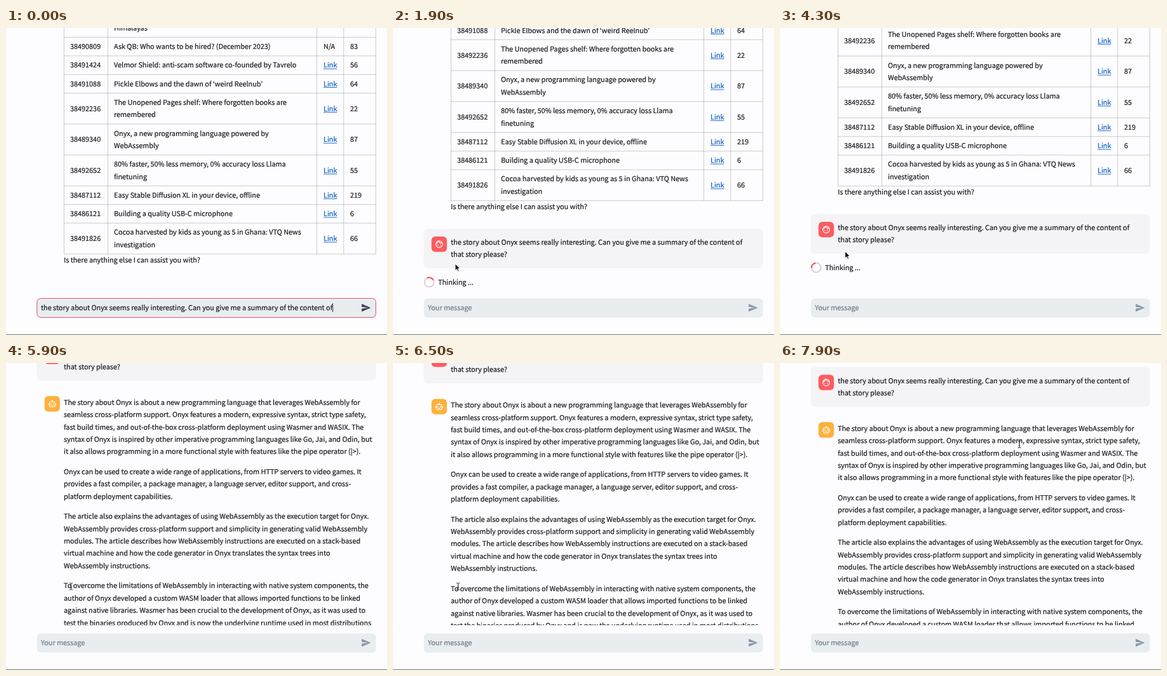
An HTML page that plays this animation: 600 by 483 pixels, repeating every 8 s.

```html
<!DOCTYPE html>
<html lang="en">
<head>
<meta charset="utf-8">
<title>Chat</title>
<style>
  html, body { margin: 0; width: 100%; height: 100%; overflow: hidden; background: #fdfcfe; }
  svg { display: block; }
  text {
    font: 10.85px "Noto Sans CJK KR", "Noto Sans CJK JP", "Noto Sans CJK SC", Lato, sans-serif;
    color: #191a21; fill: currentColor; stroke: currentColor; stroke-width: .2;
    white-space: pre; text-rendering: geometricPrecision;
  }
  .link { color: #0a5fbf; fill: currentColor; }
  .line { fill: none; stroke: #31333f; stroke-opacity: .3; stroke-width: .8; }
</style>
</head>
<body>
<svg id="stage" width="600" height="483" viewBox="0 0 600 483"></svg>
<script>
const LOOP = 8000, STEP = 100, LEADING = 19.41, ROW = 29.27;
const QUESTION = ['the story about Onyx seems really interesting. Can you give me a summary of the content of',
  'that story please?'];
const TAIL = ' that story please?';

const ROWS = [
  [38490809, ['Ask QB: Who wants to be hired? (December 2023)'], 83],
  [38491424, ['Velmor Shield: anti-scam software co-founded by Tavrelo'], 56],
  [38491088, ['Pickle Elbows and the dawn of ‘weird Reelnub’'], 64],
  [38492236, ['The Unopened Pages shelf: Where forgotten books are', 'remembered'], 22],
  [38489340, ['Onyx, a new programming language powered by', 'WebAssembly'], 87],
  [38492652, ['80% faster, 50% less memory, 0% accuracy loss Llama', 'finetuning'], 55],
  [38487112, ['Easy Stable Diffusion XL in your device, offline'], 219],
  [38486121, ['Building a quality USB-C microphone'], 6],
  [38491826, ['Cocoa harvested by kids as young as 5 in Ghana: VTQ News', 'investigation'], 66],
];

const ANSWER = [
  ['The story about Onyx is about a new programming language that leverages WebAssembly for',
   'seamless cross-platform support. Onyx features a modern, expressive syntax, strict type safety,',
   'fast build times, and out-of-the-box cross-platform deployment using Wasmer and WASIX. The',
   'syntax of Onyx is inspired by other imperative programming languages like Go, Jai, and Odin, but',
   'it also allows programming in a more functional style with features like the pipe operator (|>).'],
  ['Onyx can be used to create a wide range of applications, from HTTP servers to video games. It',
   'provides a fast compiler, a package manager, a language server, editor support, and cross-',
   'platform deployment capabilities.'],
  ['The article also explains the advantages of using WebAssembly as the execution target for Onyx.',
   'WebAssembly provides cross-platform support and simplicity in generating valid WebAssembly',
   'modules. The article describes how WebAssembly instructions are executed on a stack-based',
   'virtual machine and how the code generator in Onyx translates the syntax trees into',
   'WebAssembly instructions.'],
  ['To overcome the limitations of WebAssembly in interacting with native system components, the',
   'author of Onyx developed a custom WASM loader that allows imported functions to be linked',
   'against native libraries. Wasmer has been crucial to the development of Onyx, as it was used to',
   'test the binaries produced by Onyx and is now the underlying runtime used in most distributions'],
];

const $ = id => document.getElementById(id);
const escape = s => String(s).replace(/&/g, '&amp;').replace(/</g, '&lt;').replace(/>/g, '&gt;');

// y is the vertical middle of the line
const text = (x, y, s, attrs = '') => `<text x="${x}" y="${y + 3.8}" ${attrs}>${escape(s)}</text>`;
const lines = (x, y, list) => list.map((s, i) => text(x, y + i * LEADING, s)).join('');
const avatar = (y, color, icon) => `<g transform="translate(60.6 ${y})">
  <rect width="24.3" height="24.3" rx="6" fill="${color}"/>
  <g transform="translate(12.15 12.15)" fill="none" stroke="#fff" stroke-width="1.1">${icon}</g></g>`;

const FACE = `<circle r="5.3"/><path d="M-5.1-.8Q-1.9-1.8-.9-4.9Q1-1.3 5-1.8"/>
  <path d="M-2 .7v1.4M2 .7v1.4" stroke-width="1.3"/>`;
const ROBOT = `<rect x="-4.1" y="-3.3" width="8.2" height="8.1" rx="1"/>
  <path d="M0-3.3v-2.2M-1-5.4h2M-5.7-.6v2.8M5.7-.6v2.8M-2 2.7h4"/>
  <path d="M-1.9-.8v1.5M1.9-.8v1.5" stroke-width="1.5"/>`;

function table() {
  let y = 14.6, out = text(170, -.2, 'Himalayas'), rules = `M91 ${y}H582.5`;
  for (const [id, title, score] of ROWS) {
    const height = ROW + (title.length - 1) * LEADING, mid = y + height / 2;
    const linked = id !== 38490809;
    out += text(101, mid, id) + text(542, mid, score)
      + lines(170, mid - (title.length - 1) * LEADING / 2, title)
      + text(500, mid, linked ? 'Link' : 'N/A', linked ? 'class="link"' : '');
    if (linked) out += `<rect class="link" x="500" y="${mid + 5.2}" width="21.3" height=".9"/>`;
    y += height;
    rules += `M91 ${y}H582.5`;
  }
  for (const x of [91.4, 160.4, 489.5, 531.8, 582.3]) rules += `M${x} -10V${y}`;
  return out + `<path class="line" d="${rules}"/>`;
}

function answer() {
  let y = 496.4, out = avatar(486.6, '#fdb13c', ROBOT);
  for (const paragraph of ANSWER) {
    out += lines(91, y, paragraph);
    y += paragraph.length * LEADING + 12.13;
  }
  return out;
}

$('stage').innerHTML = `
  <rect width="600" height="483" fill="#fdfcfe"/>
  <g id="page">
    ${table()}${text(91, 365.4, 'Is there anything else I can assist you with?')}
    <g id="question">
      <rect x="48.5" y="400" width="534" height="62" rx="6" fill="#f4f3f6"/>
      ${avatar(412, '#fc5c5f', FACE)}${lines(91, 421.2, QUESTION)}
    </g>
    <g id="thinking">
      <g fill="none" stroke-width="2">
        <circle cx="57" cy="484" r="7.4" stroke="#d3d3d8"/>
        <path id="arc" d="M51.77 478.77A7.4 7.4 0 0 1 62.23 478.77" stroke="#f2505a"/>
      </g>
      ${text(71, 484, 'Thinking ...')}
    </g>
    <g id="answer">${answer()}</g>
  </g>
  <rect y="412.5" width="600" height="71" fill="#fdfcfe"/>
  <rect id="box" x="48.8" width="533.6" rx="6" fill="#e8edf0"/>
  ${text(55, 422.4, '', 'id="first"')}${text(55, 440, '', 'id="last"')}
  <rect id="caret" y="433" width=".9" height="14" fill="#191a21"/>
  <path id="send" transform="translate(558.8 432) scale(.68)" d="M2 21L23 12 2 3V10L17 12 2 14z"/>
  <rect y="482" width="600" height="1" fill="#77777b"/>
  <path id="arrow" d="M0 0V10.6L2.5 8.3 4.1 12 5.9 11.2 4.3 7.6H7.6z" fill="#111" stroke="#fff" stroke-width=".8"/>
  <path id="beam" d="M-2.5-5.5Q0-5.5 0-4Q0-5.5 2.5-5.5M0-4V4M-2.5 5.5Q0 5.5 0 4Q0 5.5 2.5 5.5M-1.3 1.5h2.6"
    fill="none" stroke="#222"/>`;

const show = (id, on) => $(id).setAttribute('display', on ? 'inline' : 'none');
const set = (id, attrs) => Object.entries(attrs).forEach(([k, v]) => $(id).setAttribute(k, v));
const progress = (t, from, to) => Math.min(1, Math.max(0, (t - from) / (to - from)));
const easeOut = u => 1 - (1 - u) ** 2.75;
const easeInOut = u => u < .5 ? 4 * u ** 3 : 1 - 4 * (1 - u) ** 3;
const mix = (a, b, u) => a + (b - a) * u;

const scrollAt = t => 107 * easeOut(progress(t, 1600, 2300))
  + 327.5 * easeOut(progress(t, 5200, 5900))
  - 41 * easeInOut(progress(t, 6200, 7200));

// [time, x, y]
const POINTER = [[1900, 98, 371], [2500, 102.5, 351.5], [6500, 102.5, 351.5], [7100, 160, 226], [7900, 377, 128]];
function pointerAt(t) {
  let [, x, y] = POINTER[0];
  for (let i = 1; i < POINTER.length; i++) {
    const [t0, x0, y0] = POINTER[i - 1], [t1, x1, y1] = POINTER[i];
    if (t >= t0) {
      const u = progress(t, t0, t1);
      x = mix(x0, x1, u);
      y = mix(y0, y1, u);
    }
  }
  return `translate(${x} ${y})`;
}

function drawInput(t) {
  const focused = t < 1700, typing = t < 1500;
  const count = t < 1400 ? Math.min(18, Math.floor(t * .015)) : TAIL.length;
  const wrapped = typing && count > 7;
  set('box', { y: wrapped ? 407.4 : 425.4, height: wrapped ? 48 : 30, stroke: focused ? '#e0525f' : 'none' });
  $('first').textContent = wrapped ? QUESTION[0] + ' that' : '';
  $('last').textContent = !typing ? 'Your message'
    : wrapped ? TAIL.slice(6, count) : QUESTION[0] + TAIL.slice(0, count);
  $('last').style.color = typing ? '' : '#757a87';
  show('caret', focused);
  set('caret', { x: 55 + (typing ? $('last').getComputedTextLength() : 0) });
  set('send', { fill: typing ? '#3d4150' : '#8d95a5' });
}

function draw(now) {
  const t = Math.floor(now % LOOP / STEP) * STEP;
  const asked = t >= 1700, answered = t >= 5300;
  show('question', asked);
  show('thinking', asked && !answered);
  show('answer', answered);
  set('page', { transform: `translate(0 ${-scrollAt(t)})` });
  set('arc', { transform: `rotate(${20 + .72 * (t - 1900)} 57 484)` });
  drawInput(t);
  show('arrow', asked && !answered);
  show('beam', answered);
  for (const id of ['arrow', 'beam']) set(id, { transform: pointerAt(t) });
  requestAnimationFrame(() => draw(performance.now() - start));
}
const start = performance.now();
draw(0);
</script>
</body>
</html>
```
